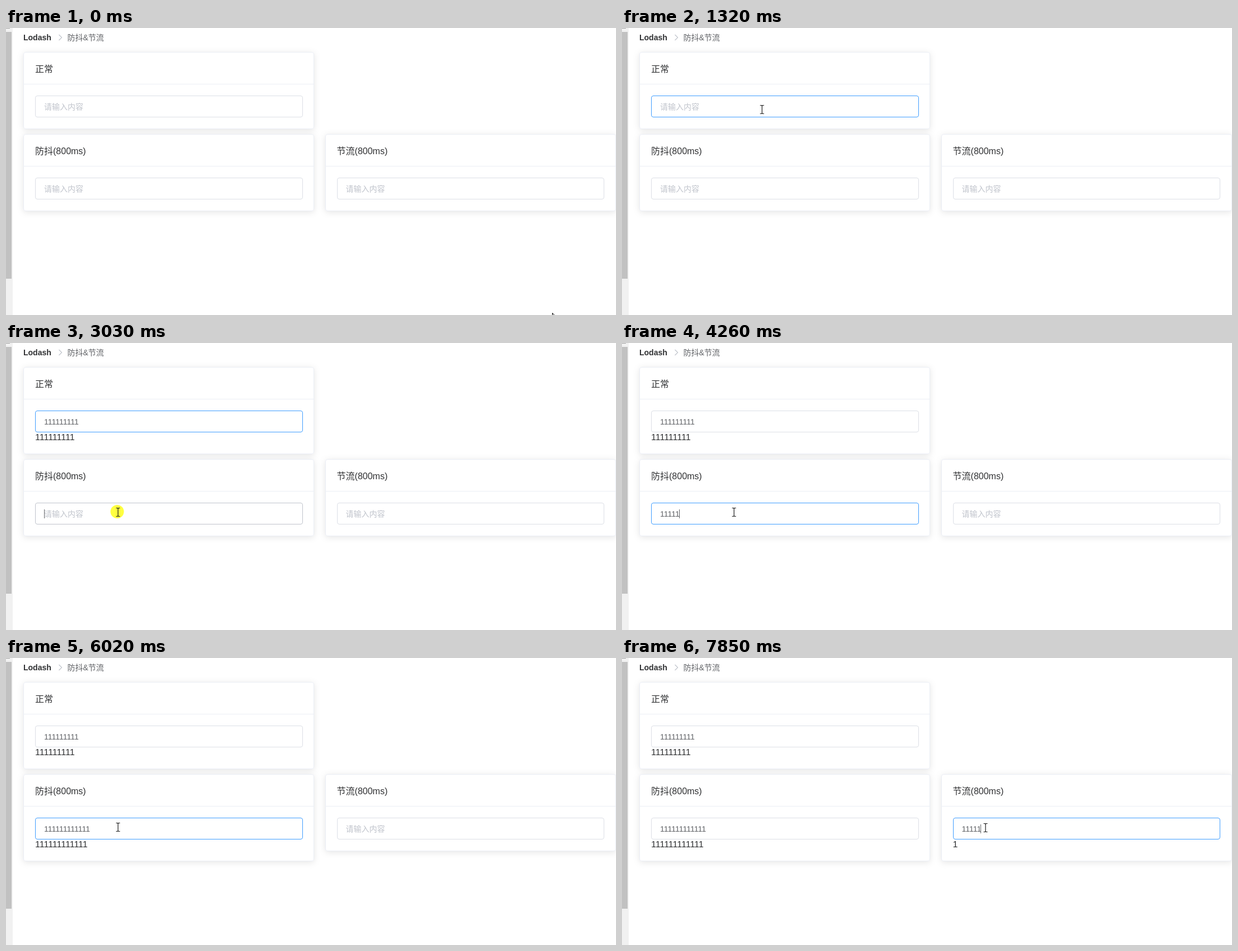
Write an HTML page that moves like this. It is 1089 by 514 pixels and loops after 7990 ms.

```html
<!DOCTYPE html>
<html lang="zh-CN">
<head>
<meta charset="utf-8">
<title>Lodash</title>
<style>
  html, body { margin: 0; width: 100%; height: 100%; overflow: hidden; background: #fff; }
  svg { display: block; font-family: "Liberation Sans", "Noto Sans CJK SC", "Noto Sans CJK", sans-serif; }
  text { white-space: pre; }
  .card { fill: #fff; stroke: #ebeef5; filter: drop-shadow(0 2px 6px rgba(0, 0, 0, .1)); }
  .line { stroke: #ebeef5; }
  .title { font-size: 16px; fill: #303133; }
  .box { fill: #fff; }
  .hint { font-size: 14px; fill: #c0c4cc; }
  .num { font-kerning: none; letter-spacing: -.0743em; text-rendering: geometricPrecision; }
  .typed { font-size: 14px; fill: #606266; }
  .echo { font-size: 16px; fill: #303133; }
  .caret { fill: #606266; }
</style>
</head>
<body>
<svg id="stage" width="1089" height="514" viewBox="0 0 1089 514">
  <rect width="12" height="514" fill="#f1f1f1"/>
  <rect y="7" width="10" height="442" fill="#c1c1c1"/>
  <rect width="7" height="1" fill="#a3a3a3"/>
  <text x="31" y="22" font-size="14" font-weight="700" fill="#303133">Lodash</text>
  <path d="M94.5 12l5 5-5 5" fill="none" stroke="#c0c4cc" stroke-width="1.2"/>
  <text x="109.5" y="22" font-size="14" fill="#606266">防抖&amp;节流</text>
  <g id="cards"></g>
  <g id="pointer">
    <circle id="press" cx="-1.5" cy="-1" r="12" fill="#ffff00" fill-opacity=".75"/>
    <path id="beam" d="M-3.5-7.5h2.5l1 1 1-1h2.5M0-6.5v13M-3.5 7.5h2.5l1-1 1 1h2.5" fill="none" stroke="#1c1c1c" stroke-width="1.2"/>
    <path id="arrow" d="M.5.5v16l3.7-3.6 2.4 5.6 2.2-1-2.4-5.4h5.1z" fill="#fff" stroke="#000"/>
  </g>
</svg>
<script>
const LOOP = 7990, STEP = 6.74;
const $ = id => document.getElementById(id);

function add(parent, tag, attrs, label) {
  const el = document.createElementNS('http://www.w3.org/2000/svg', tag);
  for (const k in attrs) el.setAttribute(k, attrs[k]);
  if (label) el.textContent = label;
  parent.appendChild(el);
  return el;
}

// x: card edge, tx: text origin, w: input width
function makeCard(x, tx, w, title) {
  const g = add($('cards'), 'g', {});
  return {
    g, tx,
    frame: add(g, 'rect', { class: 'card', x: x + .5, y: .5, width: 518, rx: 3.5 }),
    line: add(g, 'path', { class: 'line', d: `M${x + 1} 57.5h517` }),
    title: add(g, 'text', { class: 'title', x: tx + 21, y: 36 }, title),
    box: add(g, 'rect', { class: 'box', x: x + 21.5, y: 78.5, width: w, height: 38, rx: 3.5 }),
    hint: add(g, 'text', { class: 'hint', x: tx + 37, y: 103 }, '请输入内容'),
    typed: add(g, 'text', { class: 'num typed', x: tx + 37, y: 103 }),
    echo: add(g, 'text', { class: 'num echo', x: tx + 21, y: 131 }),
    caret: add(g, 'rect', { class: 'caret', y: 90, width: 1, height: 16 })
  };
}

const cards = [
  makeCard(31, 31, 477, '正常'),
  makeCard(31, 31, 477, '防抖(800ms)'),
  makeCard(570, 569.6, 476, '节流(800ms)')
];

const show = (el, on) => el.setAttribute('visibility', on ? 'visible' : 'hidden');
const within = (t, a, b) => t >= a && t < b;

// keys pressed by time t: n keys, evenly spaced from a to b
const keys = (t, a, b, n) =>
  t < a ? 0 : Math.min(n, Math.floor((t - a) / ((b - a) / (n - 1)) + 1.001));

function drawCard(c, y, s) {
  c.g.setAttribute('transform', `translate(0 ${y})`);
  c.frame.setAttribute('height', s.echo ? 155 : 137);
  c.box.setAttribute('stroke', s.focus ? '#409eff' : s.hover ? '#c0c4cc' : '#dcdfe6');
  show(c.hint, !s.n);
  c.typed.textContent = '1'.repeat(s.n);
  c.echo.textContent = '1'.repeat(s.echo);
  c.caret.setAttribute('x', Math.round(c.tx + 37 + s.n * STEP));
  show(c.caret, s.caret);
}

// stepped pointer travel: start, step length, step count, from, to, arc height
const moves = [
  [70, 77, 9, [975, 510], [250, 146], 0],
  [2480, 75, 3, [250, 146], [200, 303], 0],
  [6190, 90, 6, [200, 303], [649, 304], 16]
];

function pointerAt(t) {
  let pos = moves[0][3];
  for (const [start, dt, n, a, b, arc] of moves) {
    if (t < start) break;
    const k = Math.min(1, (Math.floor((t - start) / dt) + 1) / n);
    const e = k * k * (3 - 2 * k);
    pos = [a[0] + (b[0] - a[0]) * e, a[1] + (b[1] - a[1]) * e - arc * Math.sin(Math.PI * e)];
  }
  return pos;
}

function drawPointer(t, low) {
  const [x, y] = pointerAt(t);
  const inside = (l, r, top) => x >= l && x < r && y >= top && y < top + 39;
  const text = inside(52, 530, 121) || inside(52, 530, low + 78) || inside(591, 1068, low + 78);
  $('pointer').setAttribute('transform', `translate(${Math.round(x)} ${Math.round(y)})`);
  show($('beam'), text);
  show($('arrow'), !text);
  show($('press'), within(t, 760, 920) || within(t, 2950, 3090) || within(t, 6730, 6910));
}

function draw(t) {
  const n1 = keys(t, 1450, 2260, 7) + (t >= 2330) + (t >= 2400);
  const n2 = keys(t, 3650, 4260, 5) + (t >= 4400) + keys(t, 4560, 5260, 6);
  const n3 = keys(t, 7400, 7850, 5);
  const low = n1 ? 208 : 190;

  drawCard(cards[0], 43, {
    n: n1, echo: n1,
    focus: within(t, 920, 3090),
    hover: within(t, 686, 2480),
    caret: within(t, 840, 1320) || within(t, 1450, 2950)
  });
  drawCard(cards[1], low, {
    n: n2, echo: t >= 6020 ? n2 : 0,
    focus: within(t, 3090, 6910),
    hover: within(t, 2950, 6190),
    caret: within(t, 3020, 3490) || within(t, 3650, 5790) || within(t, 6320, 6730)
  });
  drawCard(cards[2], low, {
    n: n3, echo: n3 ? 1 : 0,
    focus: t >= 6910,
    hover: t >= 6640,
    caret: within(t, 6820, 7310) || t >= 7400
  });
  drawPointer(t, low);
}

const begin = performance.now();
function tick() {
  draw((performance.now() - begin) % LOOP);
  requestAnimationFrame(tick);
}
tick();
</script>
</body>
</html>
```
